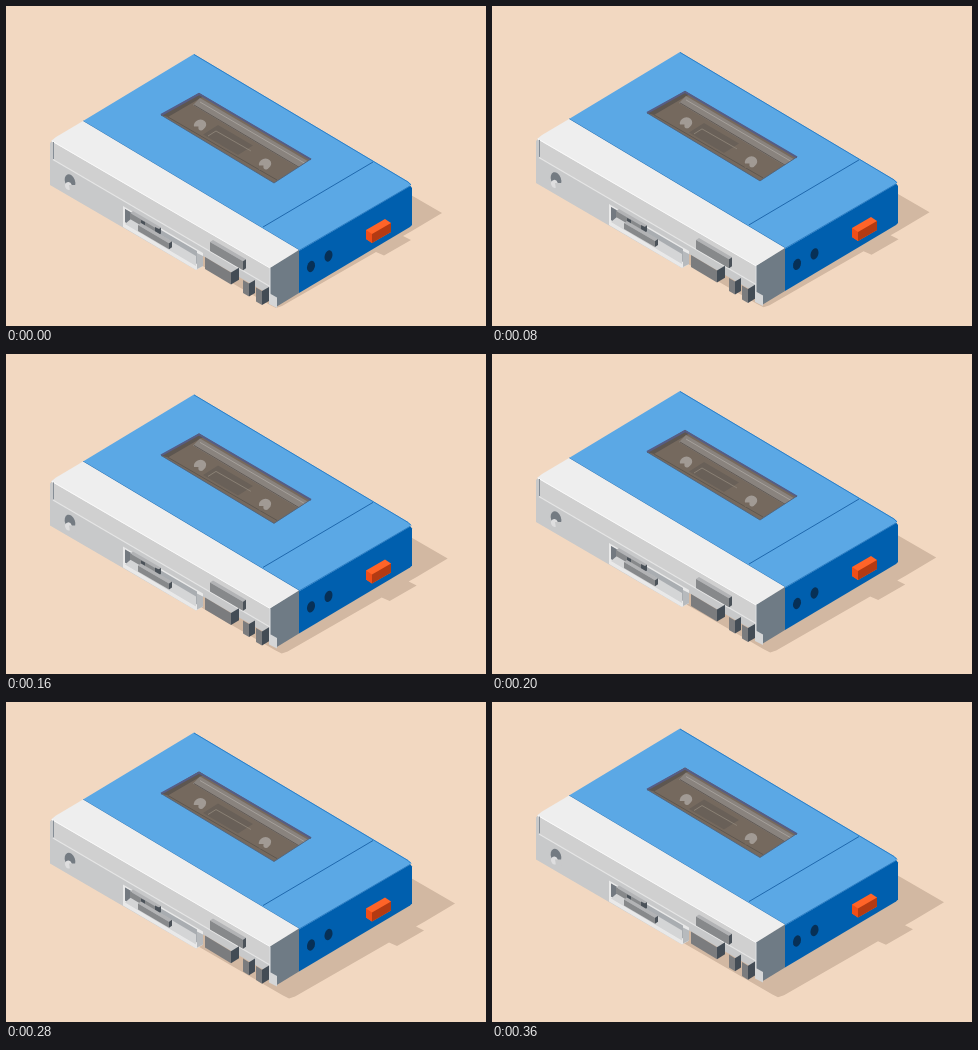
An HTML page with a canvas for the animation above (400 ms loop, 480 by 320 pixels).

```html
<!DOCTYPE html>
<html lang="en">
<head>
<meta charset="utf-8">
<title>Floating cassette player</title>
<style>
  html, body { margin: 0; width: 100%; height: 100%; overflow: hidden; background: #f2d8c1; }
  canvas { display: block; width: 480px; height: 320px; }
</style>
</head>
<body>
<canvas id="stage" width="480" height="320"></canvas>
<script>
const ctx = document.getElementById('stage').getContext('2d');
const LOOP = 400, STEP = 40, LIFT = 22;

function trace(points) {
  ctx.beginPath();
  for (let i = 0; i < points.length; i += 2) ctx.lineTo(points[i], points[i + 1]);
}

function poly(color, ...points) {
  trace(points);
  ctx.closePath();
  ctx.fillStyle = color;
  ctx.fill();
}

function line(color, width, ...points) {
  trace(points);
  ctx.strokeStyle = color;
  ctx.lineWidth = width;
  ctx.stroke();
}

function oval(color, x, y, rx, ry, tilt = 0) {
  ctx.beginPath();
  ctx.ellipse(x, y, rx, ry, tilt, 0, Math.PI * 2);
  ctx.fillStyle = color;
  ctx.fill();
}

function shadow(p) {
  ctx.save();
  ctx.translate(16.4 * p, -7 * p);
  poly('#d2b8a2', 436, 207, 405, 225.5, 397, 230, 405, 234, 378, 249.5, 370, 246,
    276, 300, 270, 302, 264, 299, 62, 182, 62, 172, 220, 82);
  ctx.restore();
}

function bar(x, y, length, height) {
  const drop = length * 0.585;
  poly('#b2b3b5', x, y, x + 3, y - 2, x + length + 3, y + drop - 2, x + length, y + drop);
  poly('#87898b', x, y, x + length, y + drop, x + length, y + drop + height, x, y + height);
  poly('#4b5259', x + length, y + drop, x + length + 3, y + drop - 2,
    x + length + 3, y + drop + height - 2, x + length, y + drop + height);
}

function key(x, y, width, depth, height) {
  const drop = width * 0.6, edge = x + width;
  poly('#7b7c7e', x, y, edge, y + drop, edge, y + drop + height, x, y + height);
  poly('#434c55', edge, y + drop, edge + depth, y + drop - depth * 0.6,
    edge + depth, y + drop + height - depth * 0.6, edge, y + drop + height);
}

function reel(x, y) {
  oval('#a19a94', x, y, 6.3, 5.4, -0.35);
  poly('#75695e', x - 7, y + 1.5, x - 1.5, y + 1.5, x + 1, y + 6, x - 6, y + 6);
  oval('#a19a94', x + 1, y + 3, 2.6, 2.4);
}

function tapeWindow() {
  poly('#75695e', 193, 87, 305, 153, 268, 177, 155, 109);
  ctx.save();
  trace([193, 87, 305, 153, 268, 177, 155, 109]);
  ctx.clip();
  poly('#5d5650', 155, 109, 193, 87, 198, 90, 162, 111);
  poly('#89837e', 194, 92, 305, 157, 295, 163, 187, 99);
  line('#a5a09b', 1, 194, 96, 300, 158);
  line('#625b56', 1, 188, 99, 296, 163);
  poly('#696058', 212, 119, 247, 139.5, 232, 149, 197, 128.5);
  line('#8a8075', 1, 202, 130, 210, 125, 245, 145);
  line('#5f574f', 1, 162, 111, 271, 174);
  reel(194, 119);
  reel(259, 158);
  ctx.restore();
  line('#555d86', 2, 155, 109, 193, 88, 305, 153.5);
  line('#4d617c', 0.8, 155, 109, 268, 177, 305, 153);
}

function blueShell() {
  poly('#005fae', 293, 244, 403, 178, 406, 182, 406, 219, 404, 221, 293, 287);
  poly('#5ba8e5', 188, 48, 402, 175.5, 405, 178, 404, 180, 293, 245, 77, 115);
  line('#2b7fc8', 1, 188, 48.5, 402, 176, 405, 179);
  line('#2e7ec3', 1, 293, 244.5, 404, 180);
  line('#2773b8', 1, 77, 115, 293, 244);
  line('#1f68ad', 1, 367, 156, 257, 221);
  tapeWindow();

  oval('#073056', 305, 260.5, 3.8, 5.8, 0.3);
  oval('#073056', 322.5, 250, 3.8, 5.8, 0.3);

  poly('#ff6428', 360, 224, 379, 213, 385, 217, 385, 226, 366, 237, 360, 233);
  poly('#f04e18', 360, 224, 366, 228, 366, 237, 360, 233);
  poly('#b43a12', 366, 228, 385, 217, 385, 226, 366, 237);
}

function sliderPanel() {
  poly('#e9e9e9', 117, 200, 197, 247, 197, 260, 190, 264, 117, 221);
  poly('#a9adb1', 119, 203, 191, 245, 191, 258, 119, 216);
  poly('#737980', 119, 203, 126, 207, 126, 220, 119, 216);
  poly('#d4d5d6', 126, 212, 190, 250, 190, 260, 119, 218);
  poly('#b7babd', 191, 247, 197, 250, 197, 260, 191, 263);
  bar(124, 207, 28, 6);
  poly('#4b5259', 135, 214, 139, 216, 139, 221, 135, 219);
  poly('#4b5259', 149, 221, 153, 223, 153, 229, 149, 227);
  bar(132, 219, 31, 6);
}

function whiteFront() {
  poly('#c8c9ca', 44, 137, 48, 133, 264, 261, 264, 289, 197, 250, 197, 260, 190, 264,
    44, 179);
  poly('#d0d0d0', 47, 135, 264, 262, 264, 280, 47, 153);
  poly('#eeeeee', 77, 115, 293, 244, 264, 262, 45, 135, 50, 131);
  line('#fafafa', 1, 46, 135, 264, 262, 292, 245);
  line('#858d95', 1, 47.5, 136, 47.5, 153);
  line('#e6e6e6', 1.2, 47, 153.5, 264, 280.5);

  oval('#747b82', 64, 175.5, 5, 7.5, -0.35);
  oval('#dededf', 62.5, 180, 3.4, 4, -0.35);
  poly('#c8c9ca', 63, 179, 70, 179, 69, 185, 64, 185);

  sliderPanel();
  bar(204, 236, 33, 9);

  key(199, 251, 26, 8, 12);
  key(237, 274, 6, 6, 13);
  key(250, 281.5, 6, 7, 14);

  poly('#6f7b85', 264, 262, 293, 244, 293, 287, 270, 301, 264, 291);
  poly('#d5d6d7', 263, 287, 271, 291.5, 271, 302, 263, 298);
  line('#dfe1e3', 1, 264, 262, 264, 288);
}

function draw(now) {
  const time = Math.floor((now % LOOP) / STEP) * STEP;
  const p = (1 - Math.cos(Math.PI * time / LOOP)) / 2;
  ctx.fillStyle = '#f2d8c1';
  ctx.fillRect(0, 0, 480, 320);
  shadow(p);
  ctx.save();
  ctx.translate(0, -LIFT * p);
  blueShell();
  whiteFront();
  ctx.restore();
}

const start = performance.now();
function tick() {
  draw(performance.now() - start);
  requestAnimationFrame(tick);
}
tick();
</script>
</body>
</html>
```
